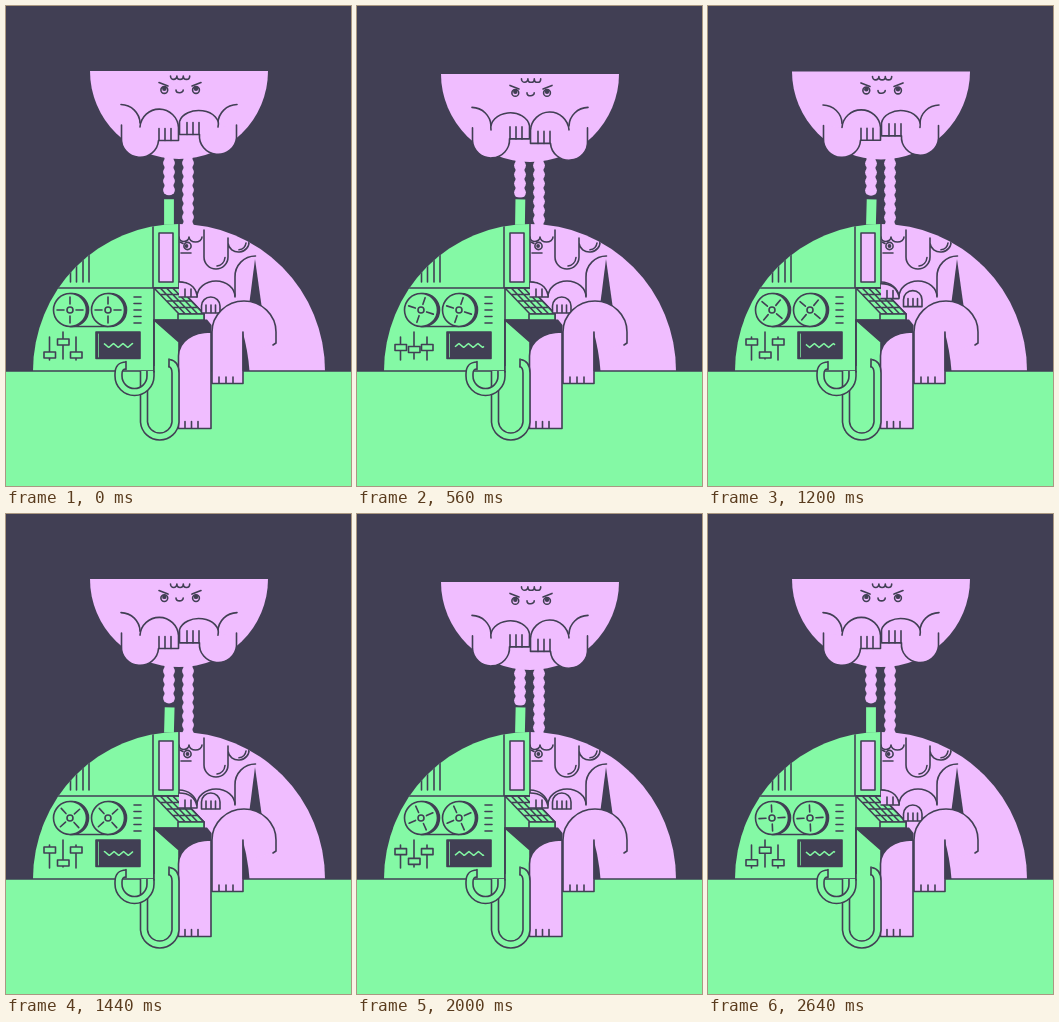
An HTML page for the animation above (2.72 s loop, 345 by 480 pixels).

```html
<!DOCTYPE html>
<html lang="en">
<head>
<meta charset="utf-8">
<title>Two minds, one machine</title>
<style>
html, body { margin: 0; width: 100%; height: 100%; overflow: hidden; background: #413f54; }
svg { display: block; width: 100vw; height: 100vh; }
.d { fill: #413f54; }
.p { fill: #f0bdff; }
.g { fill: #84f9a5; }
.l { fill: none; }
.l, .s { stroke: #413f54; stroke-width: 1.6; stroke-linejoin: round; stroke-linecap: round; }
.tube { fill: none; stroke: #413f54; stroke-width: 8.6; }
.tube.in { stroke: #84f9a5; stroke-width: 5.4; }
</style>
</head>
<body>
<svg viewBox="0 0 345 480">
  <defs>
    <clipPath id="dome"><path d="M27 365a146 147 0 0 1 292 0z"/></clipPath>
    <clipPath id="right"><path d="M173 218a146 147 0 0 1 146 147H173z"/></clipPath>
    <path id="tubeA" d="M120 359.5Q112.500 359.500 112.500 368V370A16 16 0 0 0 144.500 370V365"/>
    <path id="tubeB" d="M138 365V416A15.800 15.800 0 0 0 169.500 416V367Q169.500 358 163 357"/>
  </defs>

  <rect class="d" width="345" height="480"/>
  <rect class="g" y="365" width="345" height="115"/>

  <g id="necks" class="p"></g>
  <g id="socket"><rect class="g s" x="157.300" y="192.500" width="11.400" height="27"/></g>

  <!-- upper head -->
  <g id="head">
    <path class="p" d="M84 65H262A89 88 0 0 1 84 65z"/>
    <path class="l" d="M164.500 70a3.200 3.400 0 0 0 6.400 0a3.200 3.400 0 0 0 6.400 0a3.200 3.400 0 0 0 6.400 0"/>
    <circle class="l" cx="158.300" cy="84" r="3.400"/><circle class="d" cx="158.300" cy="82.800" r="2.200"/>
    <circle class="l" cx="190" cy="84" r="3.400"/><circle class="d" cx="190" cy="82.800" r="2.200"/>
    <path class="l" d="M153 76.500L162 80M195 76.500L186 80"/>
    <path class="l" d="M170 84a3.600 2.800 0 0 0 7.200 0"/>
    <path class="l" d="M115 98.500A19.500 19 0 0 1 134 117M231 98.500A19.500 19 0 0 0 212 117"/>
    <g id="armL"></g>
    <g id="armR"></g>
  </g>

  <!-- dome -->
  <path class="g" d="M173 218A146 147 0 0 0 27 365H173z"/>
  <path class="p" d="M173 218A146 147 0 0 1 319 365H173z"/>
  <path class="l" d="M0 365H345"/>

  <g clip-path="url(#dome)">
    <path class="l" d="M64.500 240V276M70.500 240V276M77 240V276M83 240V276M50 282H173M147 218V282M173 218V282"/>
    <rect class="p s" x="153" y="227" width="14" height="49"/>
  </g>

  <!-- lower person -->
  <g clip-path="url(#right)">
    <path class="l" d="M173 231a5 4.500 0 0 0 10 0a6.500 5 0 0 0 13 0"/>
    <path class="l" d="M198 224V251A12 12 0 0 0 222 251V232M222 237A10.500 10 0 0 0 243 235"/>
    <path class="l" d="M211 260A9.500 9.500 0 0 0 219 251.500M233 243.800A8 8 0 0 0 240 237"/>
    <circle class="l" cx="181.500" cy="240" r="3.600"/>
    <circle class="d" id="pupil" cy="240" r="1.900"/>
    <path class="l" d="M174 236L177 237.500M175 247H185"/>
    <path class="d" d="M249 253L256 303L243 300z"/>
    <path class="l" d="M229 290V271A20.500 20.500 0 0 1 249.500 250"/>
    <path class="l" d="M173 276A18 16 0 0 1 191 291A19 16 0 0 1 229 291"/>
  </g>

  <!-- keyboard and desk -->
  <path class="g s" d="M148 282H173L198 308V314H148z"/>
  <path class="l" id="keys"/>
  <path class="d" d="M147.500 313.500H201L205.500 319V365H147.500z"/>
  <path class="g s" d="M148 314L173 336V365H148z"/>
  <path class="g" d="M148 360H173V366H148z"/>
  <g id="handL">
    <path class="p s" d="M173 276Q188 276 191 289V291H173"/>
    <path class="l" d="M179 283v7.500M185 283v7.500"/>
  </g>
  <g id="handR">
    <path class="p s" d="M195.500 307V300A9.200 9 0 0 1 214 300V307z"/>
    <path class="l" d="M200 299v7.500M205 299v7.500M209.500 299v7.500"/>
  </g>
  <path class="g s" d="M172 308H198V314H172z"/>

  <!-- legs -->
  <path class="p s" d="M172.500 422.500V350C172.500 335 187 326 205 326V422.500z"/>
  <path class="l" d="M179 415.500v6.500M185.500 415.500v6.500M192 415.500v6.500"/>
  <path class="p" d="M206 377.500V326A32 31 0 0 1 270 326V337L244 346L237 326V377.500z"/>
  <path class="l" d="M206 377.500V326A32 31 0 0 1 270 326V337L267 339M206 377.500H237V326M213 371v6M220 371v6M227 371v6"/>
  <path class="d" d="M236.500 325Q242 345 243.500 365H236.500z"/>

  <!-- instruments -->
  <path class="l" d="M64 320.500H102M128 291h7M128 297.500h7M128 304h7M128 310.500h7M128 317h7"/>
  <g id="reels"></g>
  <path class="l" d="M43.500 331V354M57 326V353M70 331V354"/>
  <g id="sliders"></g>
  <rect class="d s" x="90" y="326" width="44" height="26.500"/>
  <path class="l" d="M92.500 328V351" style="stroke:#84f9a5;stroke-width:.7"/>
  <path id="wave" fill="none" stroke="#84f9a5" stroke-width="1.500" stroke-linejoin="round"/>

  <!-- machine arms -->
  <use href="#tubeB" class="tube"/><use href="#tubeB" class="tube in"/>
  <use href="#tubeA" class="tube"/><use href="#tubeA" class="tube in"/>
  <path class="l" d="M120 355.500V363.500M163 353V361M148 314V366"/>
</svg>
<script>
const STEP = 80, COUNT = 34, TAU = Math.PI * 2;
const NS = 'http://www.w3.org/2000/svg';
const el = id => document.getElementById(id);
const clamp = v => Math.max(0, Math.min(1, v));
const move = (id, x, y) => el(id).setAttribute('transform', `translate(${x} ${y})`);

function add(parent, tag, attrs) {
  const node = document.createElementNS(NS, tag);
  for (const k in attrs) node.setAttribute(k, attrs[k]);
  return parent.appendChild(node);
}

// two braided necks
for (const [x, end] of [[163, 188], [182, 222]]) {
  add(el('necks'), 'rect', { x: x - 4.5, y: 145, width: 9, height: end - 145 });
  for (let y = 148; y <= end; y += 9)
    add(el('necks'), 'ellipse', { cx: x, cy: y, rx: 5.9, ry: 5.3 });
}

// slanted key grid
let grid = '';
for (let i = 0; i <= 4; i++) {
  const a = i / 4, x = 148 + a * 25;
  grid += `M${x} 282l25 26M${x} ${282 + a * 26}h25`;
}
el('keys').setAttribute('d', grid);

const REELS = [64, 102];
const spokes = REELS.map(x => {
  add(el('reels'), 'circle', { cx: x + 2, cy: 304, r: 16.5, class: 'd s' });
  add(el('reels'), 'circle', { cx: x, cy: 304, r: 16.5, class: 'g s' });
  add(el('reels'), 'circle', { cx: x, cy: 304, r: 3, class: 'l' });
  return add(el('reels'), 'path', {
    class: 'l', d: `M${x + 6} 304h7M${x - 6} 304h-7M${x} 310v7M${x} 298v-7`
  });
});

const knobs = [43.5, 57, 70].map(x =>
  add(el('sliders'), 'rect', { x: x - 5.5, width: 11.5, height: 6, class: 'g s' }));

// a folded arm; side is -1 (left) or 1 (right)
function makeArm(id, side) {
  const X = d => 173 + side * d, sweep = side < 0 ? 0 : 1;
  const fill = add(el(id), 'path', { class: 'p' });
  const line = add(el(id), 'path', { class: 'l' });
  const fingers = add(el(id), 'path', { class: 'l' });
  return hand => {
    const d = `M${X(57.5)} 119V132A18.5 18 0 0 ${sweep} ${X(20.5)} ${hand}H${X(0.5)}` +
      `V${hand - 13}A19.3 ${hand - 115} 0 0 ${sweep ? 1 : 0} ${X(39)} 121`;
    fill.setAttribute('d', d);
    line.setAttribute('d', d);
    fingers.setAttribute('d', [20, 14, 8].map(x => `M${X(x)} ${hand - 12}v12`).join(''));
  };
}
const armL = makeArm('armL', -1), armR = makeArm('armR', 1);

function draw(ms) {
  const f = Math.floor(ms / STEP) % COUNT, u = f / COUNT;
  const sway = clamp(1.15 * (1 - Math.cos(TAU * 2 * u)) / 2);
  const slide = clamp(1.6 * (1 - Math.cos(TAU * u)) / 2);
  const press = clamp((Math.cos(TAU * 5 * u) - 0.06) * 2.2);

  move('head', 0, 2.9 * sway);
  move('necks', 0, 2.5 * sway);
  el('socket').setAttribute('transform', `rotate(${1.5 * slide} 163 218)`);
  armL(134.5 - 4.5 * sway);
  armR(128.5 + 6 * sway);

  move('handL', 0, 3 * (1 - press));
  move('handR', 0, -12 * (1 - press));
  el('pupil').setAttribute('cx', 180.5 + slide);

  spokes.forEach((s, i) => s.setAttribute('transform', `rotate(${90 * u} ${REELS[i]} 304)`));
  knobs.forEach((k, i) => k.setAttribute('y', i === 1 ? 333 + 13 * slide : 346 - 13 * slide));

  // triangle wave scrolling across the scope
  const tri = x => 2 * Math.abs(2 * (x - Math.floor(x + 0.5))) - 1;
  let d = '';
  for (let x = 98; x <= 127; x += 0.5)
    d += `${d ? 'L' : 'M'}${x} ${(339.5 + 2 * tri((x - 98) / 9.5 - 2 * u)).toFixed(2)}`;
  el('wave').setAttribute('d', d);
}

function tick(now) {
  draw(now % (STEP * COUNT));
  requestAnimationFrame(tick);
}
draw(0);
requestAnimationFrame(tick);
</script>
</body>
</html>
```
